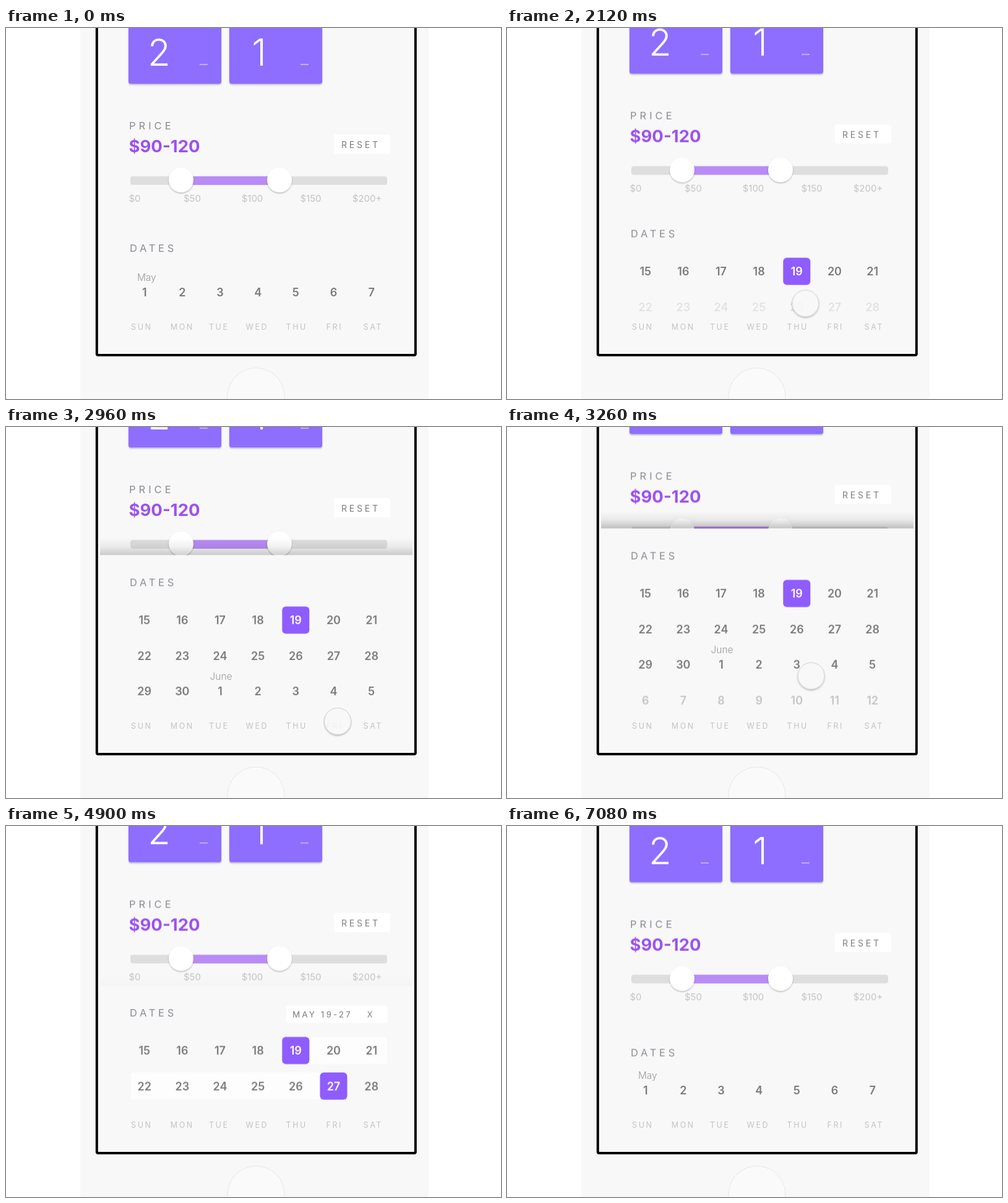
Write an HTML page that moves like this. It is 800x600 px and loops after 7.14 s.

```html
<!DOCTYPE html>
<html lang="en">
<head>
<meta charset="utf-8">
<title>Booking filter</title>
<style>
  html, body { margin: 0; width: 100%; height: 100%; overflow: hidden; background: #fff; }
  svg { display: block; width: 800px; height: 600px; font-family: Inter, "Open Sans", sans-serif; }
</style>
</head>
<body>
<svg id="stage" viewBox="0 0 800 600">
  <defs>
    <clipPath id="screen"><rect x="150" y="0" width="508" height="524"/></clipPath>
    <linearGradient id="shade" x1="0" y1="0" x2="0" y2="1">
      <stop offset="0" stop-opacity="0"/>
      <stop offset=".5" stop-opacity=".07"/>
      <stop offset="1" stop-opacity=".25"/>
    </linearGradient>
    <filter id="drop" x="-20%" y="-20%" width="140%" height="150%">
      <feDropShadow dx="0" dy="1.5" stdDeviation="1.2" flood-opacity=".28"/>
    </filter>
  </defs>
  <rect x="120" width="563" height="600" fill="#f8f8f8"/>
  <circle cx="404" cy="596" r="46" fill="#fafafa" stroke="#d4d4d4" stroke-dasharray="1.5 1.5"/>
  <rect x="146.8" y="-20" width="515" height="549" rx="2" fill="#fff" stroke="#000" stroke-width="4"/>
  <rect x="150" width="508" height="524" fill="#f8f8f8"/>
  <g clip-path="url(#screen)">
    <g id="top"></g>
    <g id="panel">
      <rect id="shadow" x="152" y="294" width="505" height="28.5" fill="url(#shade)"/>
      <rect x="150" y="322.5" width="508" height="420" fill="#f8f8f8"/>
    </g>
    <g id="days"></g>
    <g id="cursor">
      <circle r="21.5" fill="#fcfcfc" fill-opacity=".85" stroke="#cfcfcf" filter="url(#drop)"/>
    </g>
  </g>
</svg>
<script>
const LOOP = 7140, ROW = 57.6, LIFT = 28.9, PAGE = 507;
const BASE = 427.5;
const $ = id => document.getElementById(id);
const col = i => 223.7 + 61.15 * i;

function add(parent, tag, attrs = {}, text = '') {
  const el = document.createElementNS('http://www.w3.org/2000/svg', tag);
  for (const k in attrs) el.setAttribute(k, attrs[k]);
  el.textContent = text;
  parent.append(el);
  return el;
}

// Text placed by the vertical middle of its capitals
function label(parent, text, x, mid, size, fill, opt = {}) {
  const { weight = 400, gap = 0, anchor = 'start' } = opt;
  return add(parent, 'text', {
    x, y: mid + size * 0.364, fill, 'font-size': size, 'font-weight': weight,
    'letter-spacing': gap, 'text-anchor': anchor
  }, text);
}

const box = (parent, x, y, width, height, rx, fill, more) =>
  add(parent, 'rect', { x, y, width, height, rx, fill, ...more });

// steps: [ms, value, easing to the next step]
function play(el, prop, steps, map = v => v) {
  const frames = steps.map(([t, v, easing = 'ease-in-out']) =>
    ({ offset: t / LOOP, [prop]: map(v), easing }));
  frames.push({ offset: 1, [prop]: map(steps[steps.length - 1][1]) });
  el.animate(frames, { duration: LOOP, iterations: Infinity });
}
const fade = (el, steps) => play(el, 'opacity', steps);
const shiftX = v => `translate(${v}px, 0px)`;
const shiftY = v => `translate(0px, ${v}px)`;

// Guests and price
const top_ = $('top');
[[198, '2', 247.5], [361, '1', 409]].forEach(([x, n, mid]) => {
  box(top_, x, -80, 150, 171, 4, '#8d6eff', { filter: 'url(#drop)' });
  label(top_, n, mid, 40, 60, '#fff', { weight: 300, anchor: 'middle' });
  box(top_, x + 115, 59, 13, 1.5, 0, '#d2c6ff');
});
label(top_, 'PRICE', 199, 158.8, 16.5, '#8c8a92', { gap: 5 });
label(top_, '$90-120', 198.5, 191.3, 27.5, '#9b51ee', { weight: 700 });
box(top_, 530, 173, 91, 31, 4, '#fff');
label(top_, 'RESET', 542, 189.5, 14, '#7c7a80', { gap: 3.8 });
box(top_, 201, 240.5, 415, 14, 4, '#dedede');
box(top_, 283, 240.5, 159, 14, 0, '#b88bf6');
[283, 442].forEach(cx => add(top_, 'circle', { cx, cy: 246.5, r: 20, fill: '#fff', filter: 'url(#drop)' }));
[['$0', 208], ['$50', 301], ['$100', 398], ['$150', 492.5], ['$200+', 583.5]].forEach(([s, x]) =>
  label(top_, s, x, 276, 15, '#c3c2c6', { anchor: 'middle' }));

// Calendar
const panel = $('panel');
const title = label(panel, 'DATES', 200, 366, 16.5, '#8c8a92', { gap: 4.7 });

const badge = add(panel, 'g');
box(badge, 453, 355, 164, 28, 4, '#fff');
label(badge, 'MAY 19-27', 463, 369.5, 13.5, '#7c7a80', { gap: 3.1 });
label(badge, 'X', 588, 369.5, 12.5, '#7c7a80', { anchor: 'middle' });

const span = add(panel, 'g');
box(span, 468, BASE - 22, 148, 44, 4, '#fff', { 'fill-opacity': .7 });
box(span, 202, BASE + ROW - 22, 327, 44, 4, '#fff', { 'fill-opacity': .7 });

const number = (parent, n, i, y, fill) =>
  label(parent, n, col(i), y, 18, fill, { weight: 600, anchor: 'middle' });

function week(parent, first, y, last = 31) {
  const g = add(parent, 'g');
  for (let i = 0; i < 7; i++) number(g, (first + i - 1) % last + 1, i, y, '#7b7a7d');
  return g;
}
const month = (parent, name, x, y) =>
  label(parent, name, x, y - 24, 15.5, '#98979b', { weight: 300, anchor: 'middle' });

const pages = add(panel, 'g');
const weeks = add(pages, 'g');
[1, 8, 15].forEach((first, k) => {
  week(weeks, first, BASE).setAttribute('transform', `translate(${k * PAGE} 0)`);
});
month(weeks, 'May', 227.3, BASE);

const extra = [22, 29, 6].map((first, k) => week(panel, first, BASE + ROW * (k + 1), first === 29 ? 30 : 31));
month(extra[1], 'June', 347.5, BASE + ROW * 2);

function pick(n, i, y) {
  const g = add(panel, 'g');
  box(g, col(i) - 22, y - 22, 44, 44, 6, '#8f5cff');
  number(g, n, i, y, '#fff');
  return g;
}
const from = pick(19, 4, BASE), to = pick(27, 5, BASE + ROW);

[['SUN', 218], ['MON', 283.5], ['TUE', 343], ['WED', 404.5], ['THU', 468.5], ['FRI', 529.5], ['SAT', 592]]
  .forEach(([s, x]) => label($('days'), s, x + 1.3, 483.3, 12.5, '#c3c2c6', { gap: 2.6, anchor: 'middle' }));

// Motion
const rows = [[1900, 1], [2300, 2], [2640, 2], [2930, 3], [3000, 3], [3400, 4],
  [4420, 4], [5000, 2], [6180, 2], [6500, 1]];
const rise = step => rows.map(([t, n]) => [t, -step * (n - 1)]);
play(panel, 'transform', [[0, 0], ...rise(ROW)], shiftY);
play(top_, 'transform', [[0, -.7], [240, 0], ...rise(LIFT)], shiftY);
play(title, 'transform', [[0, -10.5], [20, -10.5], [240, 0]], shiftY);
fade($('shadow'), [[0, 0], [2640, 0], [2930, .75], [3000, .75], [3400, 1],
  [4420, 1], [5000, 0]]);

play(weeks, 'transform', [[0, 0], [180, 0], [580, -PAGE], [780, -PAGE], [1160, -2 * PAGE - 9],
  [1240, -2 * PAGE - 6], [1420, -2 * PAGE], [6340, -2 * PAGE, 'step-end'], [6341, 0]], shiftX);
fade(pages, [[0, 1], [6200, 1], [6340, 0], [6500, 1]]);
fade($('days'), [[0, 1], [60, 1], [240, 0], [1250, 0], [1450, 1]]);

fade(extra[0], [[0, 0], [2050, 0], [2300, 1], [6180, 1], [6340, 0]]);
fade(extra[1], [[0, 0], [2730, 0], [2930, 1], [4420, 1], [4700, 0]]);
fade(extra[2], [[0, 0], [3150, 0], [3400, 1], [4420, 1], [4580, 0]]);

const clear = [[5860, 1], [5980, .7], [6180, 0]];
fade(from, [[0, 0], [1800, 0], [1880, 1], ...clear]);
fade(to, [[0, 0], [4060, 0], [4140, 1], ...clear]);
[span, badge].forEach(el => fade(el, [[0, 0], [4120, 0], [4320, 1], [5860, 1], [5980, .5], [6180, 0]]));

play($('cursor'), 'transform', [
  [0, [690, 505]], [20, [690, 505]], [160, [600, 474]],
  [540, [230, 470]], [780, [600, 474]], [1240, [158, 471]], [1330, [126, 472]],
  [1460, [126, 472]], [1780, [464, 432]], [1920, [464, 432]], [2440, [523, 475]],
  [2560, [523, 475]], [2740, [530, 392]], [2960, [536, 476]], [3160, [536, 392]],
  [3600, [126, 490]], [3680, [126, 490], 'linear'], [3840, [384, 398], 'ease-out'],
  [4020, [529, 318]], [4180, [529, 318]], [4340, [540, 325]], [4420, [540, 325]],
  [4800, [690, 400]], [5560, [690, 400]], [5820, [585, 314]],
  [6000, [585, 314]], [6260, [690, 370]]
], ([x, y]) => `translate(${x}px, ${y}px)`);
</script>
</body>
</html>
```
